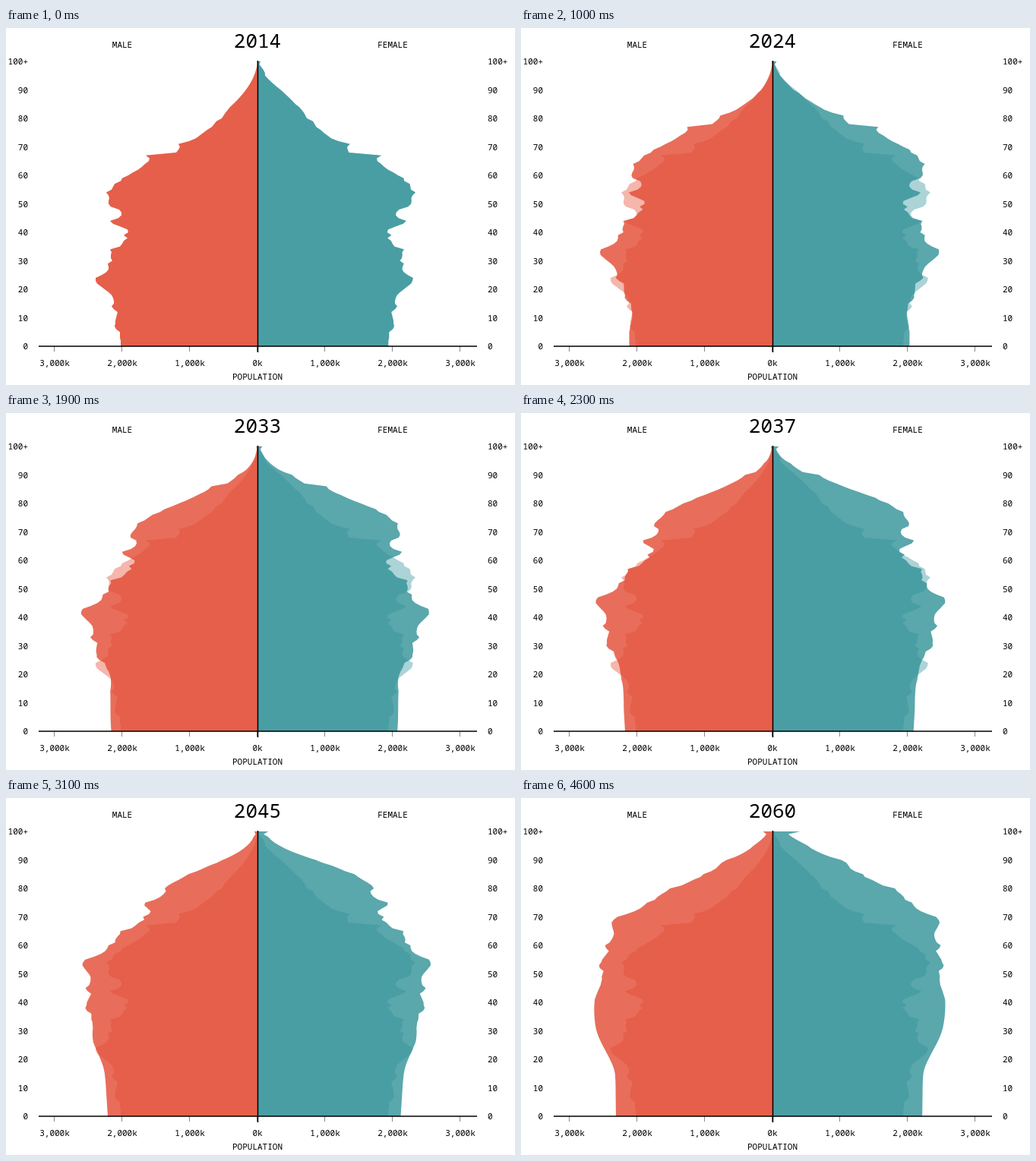
An HTML page for the animation above (4.7 s loop, 670 by 470 pixels).

```html
<!DOCTYPE html>
<html lang="en">
<head>
<meta charset="utf-8">
<title>Population pyramid</title>
<style>
  html, body { margin: 0; width: 100%; height: 100%; overflow: hidden; background: #fff; }
  svg { display: block; }
  text { font: 11px "Noto Sans Mono", monospace; text-anchor: middle; }
  #year { font-size: 26px; }
  .end { text-anchor: end; }
  .start { text-anchor: start; }
  .past { opacity: .4; }
  .now { opacity: .8; }
  .axis { stroke: #000; stroke-width: 1.5; }
  .tick { stroke: #888; }
</style>
</head>
<body>
<svg width="670" height="470" viewBox="0 0 670 470">
  <g id="areas"></g>
  <g id="labels"></g>
  <path class="axis" d="M43 419H620M331.5 43V427"/>
  <text id="year" x="331" y="26"></text>
  <text x="153" y="26">MALE</text>
  <text x="509" y="26">FEMALE</text>
  <text x="331" y="463">POPULATION</text>
</svg>
<script>
const CENTER = 331, BOTTOM = 419, STEP = 3.75, FIRST = 2014, COUNT = 47, HOLD = 100;

// Men by age in the first year, as bar widths; a smooth tail continues it.
const MEN = [
  180, 180, 180, 181, 181, 181, 186, 188, 187, 187, 186, 185, 184, 189, 192, 189, 189, 190, 192, 196,
  201, 206, 211, 213, 213, 205, 199, 196, 196, 197, 191, 193, 193, 192, 194, 181, 178, 176, 171, 176,
  170, 171, 180, 190, 194, 183, 179, 179, 182, 193, 196, 196, 195, 196, 199, 192, 190, 188, 180, 178,
  170, 164, 157, 152, 148, 143, 142, 147, 107, 104, 102, 104, 90, 81, 76, 71, 66, 60, 57, 54,
  47, 44.5, 42, 39, 36, 32];
const LAST = MEN.length - 1;

// Curves as x, y pairs: women per man, newborn boys and net migration.
const WOMEN = [0,.957, 23,.958, 34,.995, 44,1.01, 54,1.045, 60,1.088, 67,1.109, 70,1.157,
  75,1.225, 80,1.383, 85,1.56, 90,2, 95,2.25, 99,6];
const BIRTHS = [0,180, 5,186, 15,191, 31,197, 46,206];
const MIGRATION = [0,.003, 10,.003, 15,.0045, 18,.009, 20,.0102, 24,.0108, 27,.0094,
  31,.0062, 40,.0033, 47,.0022, 57,.0015, 71,0];

// Mortality is the logarithm of the yearly death rate by age.
const sides = [
  { dir: -1, color: "#e34a33", ratio: () => 1, oldest: 1.55,
    mortality: [0,-9, 20,-7, 40,-6, 57,-4.79, 71,-3.73, 78,-2.94, 86,-2.01, 92,-1.33, 98,-.65] },
  { dir: 1, color: "#319198", ratio: age => at(WOMEN, age), oldest: 1.75,
    mortality: [0,-9, 20,-8.2, 40,-6.6, 64,-4.95, 71,-4.3, 78,-3.36, 86,-2.33, 92,-1.56, 98,-1] }
];

// Piecewise linear curve, held constant beyond its ends.
function at(curve, x) {
  if (x <= curve[0]) return curve[1];
  for (let i = 2; i < curve.length; i += 2)
    if (x <= curve[i]) {
      const f = (x - curve[i - 2]) / (curve[i] - curve[i - 2]);
      return curve[i - 1] + (curve[i + 1] - curve[i - 1]) * f;
    }
  return curve[curve.length - 1];
}

const men = age => age <= LAST ? MEN[age]
  : MEN[LAST] * ((100.5 - age) / (100.5 - LAST)) ** 1.9;

// Every cohort grows one year older: people move in, and ever fewer die.
function project(side) {
  const years = [Array.from({ length: 100 }, (_, age) => men(age) * side.ratio(age))];
  for (let t = 0; t < COUNT - 1; t++) {
    const next = [at(BIRTHS, t + 1) * side.ratio(0)];
    for (let age = 0; age < 99; age++) {
      const arrivals = at(MIGRATION, age + .5) * Math.min(1.1, .88 + .01 * t);
      const deaths = Math.exp(at(side.mortality, age + .5) - .013 * t);
      next.push(years[t][age] * Math.exp(arrivals - deaths));
    }
    years.push(next);
  }
  for (const row of years) row.push(row[99] * side.oldest);
  return years;
}

function outline(side, t) {
  const edge = side.years[t].map((w, age) =>
    `${(CENTER + side.dir * w).toFixed(2)},${BOTTOM - age * STEP}`);
  return `${CENTER},${BOTTOM} ${edge.join(" ")} ${CENTER},${BOTTOM - 100 * STEP}`;
}

function add(parent, tag, attrs, text = "") {
  const node = document.createElementNS("http://www.w3.org/2000/svg", tag);
  for (const key in attrs) node.setAttribute(key, attrs[key]);
  node.textContent = text;
  return parent.appendChild(node);
}

const areas = document.getElementById("areas");
const labels = document.getElementById("labels");
const title = document.getElementById("year");

for (const side of sides) {
  side.years = project(side);
  add(areas, "polygon", { class: "past", fill: side.color, points: outline(side, 0) });
  side.shape = add(areas, "polygon", { class: "now", fill: side.color });
}

for (let age = 0; age <= 100; age += 10) {
  const y = BOTTOM + 4 - age * STEP, label = age < 100 ? age : "100+";
  add(labels, "text", { class: "end", x: 29, y }, label);
  add(labels, "text", { class: "start", x: 634, y }, label);
}
for (let n = -3; n <= 3; n++) {
  const x = CENTER + n * 89;
  add(labels, "path", { class: "tick", d: `M${x - .5} ${BOTTOM}v7` });
  add(labels, "text", { x, y: 445 }, n ? `${Math.abs(n)},000k` : "0k");
}

let shown;
function draw() {
  const t = Math.floor(performance.now() / HOLD) % COUNT;
  if (t !== shown) {
    shown = t;
    title.textContent = FIRST + t;
    for (const side of sides) side.shape.setAttribute("points", outline(side, t));
  }
  requestAnimationFrame(draw);
}
draw();
</script>
</body>
</html>
```
